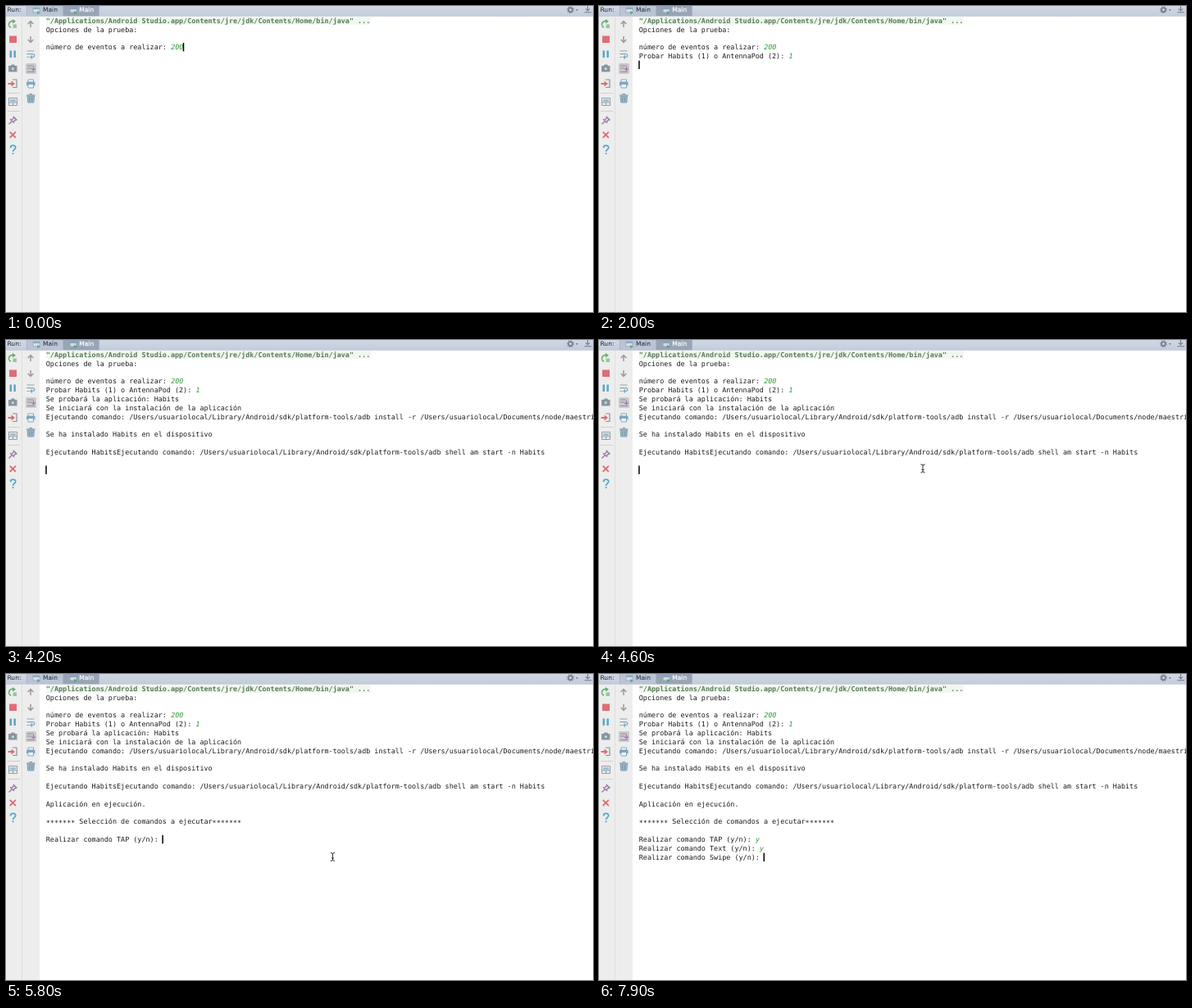
These frames come from a looping animation (716x374 px, 8 s). An HTML page:

```html
<!DOCTYPE html>
<html lang="es">
<head>
<meta charset="utf-8">
<title>Consola</title>
<style>
  html, body { margin: 0; width: 100%; height: 100%; overflow: hidden; background: #fff; }
  svg { display: block; width: 716px; height: 374px; }
  text { white-space: pre; text-rendering: geometricPrecision; }
  #console { font: 8.434px "DejaVu Sans Mono", monospace; fill: #1c1c1c; }
  #console .command { font-weight: bold; fill: #587a58; }
  #console .input { font-style: italic; fill: #319a3a; }
  .ui { font: 7.5px "DejaVu Sans", sans-serif; fill: #20242b; }
  .line { fill: none; stroke-width: 1.2; }
</style>
</head>
<body>
<svg viewBox="0 0 716 374">
  <defs>
    <linearGradient id="bar" x2="0" y2="1">
      <stop stop-color="#d0d8e4"/><stop offset="1" stop-color="#c3ccda"/>
    </linearGradient>
    <g id="tab-icon" opacity=".8">
      <path d="M0 0h8v6H0z" fill="#dfe6ee" stroke="#8595a8" stroke-width=".7"/>
      <path d="M0 0h8v2H0z" fill="#7fa5c4"/>
      <path d="M5 4l4 2.3-4 2.3z" fill="#58a65c"/>
    </g>
    <path id="arrow" d="M0 4V-3.5M-3.3 0L0-3.5 3.3 0" class="line" stroke="#8c8c8c" style="stroke-width:1.5"/>
  </defs>

  <rect width="716" height="374" fill="#fff"/>
  <rect y="12" width="41" height="362" fill="#ededed"/>
  <path d="M19.5 13v361" stroke="#dedede"/>
  <path d="M2 106.5h15M2 128.5h15" stroke="#cfcfcf"/>

  <rect width="716" height="12.5" fill="url(#bar)"/>
  <rect x="26" width="43" height="12.5" fill="#b9c5d5"/>
  <rect x="70" width="43.5" height="12.5" fill="#98a5b7"/>
  <path d="M25.5 0v12M69.5 0v12M113.5 0v12" stroke="#a9b4c3"/>
  <path d="M0 12.5h716" stroke="#c3cad4" stroke-width=".6"/>
  <use href="#tab-icon" x="33" y="2"/>
  <use href="#tab-icon" x="78" y="2"/>
  <text class="ui" x="1.5" y="7.4">Run:</text>
  <text class="ui" x="45" y="7.4">Main</text>
  <text class="ui" x="89.3" y="7.4" style="fill:#fff;stroke:#fff;stroke-width:.25">Main</text>
  <g fill="none" stroke="#727b88">
    <circle cx="688.5" cy="4.7" r="2.4" stroke-width="1.6"/>
    <circle cx="688.5" cy="4.7" r="3.8" stroke-width="1.1" stroke-dasharray="1.49"/>
    <path d="M709.5 0v5.5M707 3.3l2.5 2.5 2.5-2.5M705.5 7.8h8.5" stroke-width="1.1"/>
  </g>
  <path d="M694.7 4h3.2l-1.6 1.9z" fill="#727b88"/>

  <g opacity=".85">
    <!-- left tools -->
    <g class="line" stroke="#4fa35a">
      <path d="M9.3 18.7A4 4 0 1 0 6 26.3" style="stroke-width:1.6"/>
      <path d="M8 16l4 2.8-4 2.8z" fill="#4fa35a" stroke="none"/>
      <path d="M8.5 22.5H13V27H8.5z" fill="#7fc487" stroke="none"/>
    </g>
    <rect x="4" y="36.5" width="9" height="8.5" fill="#db5860"/>
    <path d="M4.5 54.5h2.5v8.5H4.5zM9.4 54.5h2.5v8.5H9.4z" fill="#4699c2"/>
    <path d="M3 73h2.7l1-1.5h3.4l1 1.5h2.4v7.5H3z" fill="#7c8992"/>
    <circle cx="8.3" cy="76.7" r="2.4" fill="#a9d0e4" stroke="#52636f" stroke-width=".8"/>
    <path d="M8 90h5v9.5H8" class="line" stroke="#75808d"/>
    <path d="M2.5 94h4v-2.6L11 95l-4.5 3.6V96h-4z" fill="#d8575d"/>
    <path d="M3.5 112.5h10v9h-10zM3.5 118h10M8.5 118v3" class="line" stroke="#82909c" style="stroke-width:1"/>
    <path d="M5 114h7v3H5z" fill="#8bbbd8"/>
    <path d="M3.5 144.5l3.6-3.5M5 138.2l5 4.8M6.5 139.5l3.3-3M9 141.8l3.2-3.2M8.8 135l4.6 4.6" class="line" stroke="#9269a2" style="stroke-width:1.5"/>
    <path d="M4.7 153.8l7.2 7.2M11.9 153.8l-7.2 7.2" class="line" stroke="#db5860" style="stroke-width:1.8"/>
    <path d="M5.5 173.5c0-4 6.2-4 6.2-.5 0 2.4-3.1 2.4-3.1 5" class="line" stroke="#399cc5" style="stroke-width:1.8"/>
    <circle cx="8.6" cy="180.3" r="1.1" fill="#399cc5"/>

    <!-- right tools -->
    <use href="#arrow" x="30" y="22"/>
    <use href="#arrow" transform="translate(30 41) scale(1 -1)"/>
    <path d="M25.5 55h9M25.5 62.5h3" class="line" stroke="#8a949e"/>
    <path d="M25.5 58.7h7c3 0 3 3.8 0 3.8h-2M32 60.5l-2 2 2 2" class="line" stroke="#5f9dbd"/>
    <rect x="24" y="70" width="13" height="13" rx="1.5" fill="#c4c4c6"/>
    <path d="M26 73h7.5M26 76h5M26 80.5h9" class="line" stroke="#8b7b95"/>
    <path d="M33.5 74v4.5M31.3 76.5l2.2 2.2 2.2-2.2" class="line" stroke="#9a62aa"/>
    <path d="M27 90h6.5v3H27zM27 96h6.5v4H27z" fill="#fff" stroke="#7299b0"/>
    <path d="M25 92.8h10.5v4.5H25z" fill="#689dba"/>
    <path d="M27.5 96h5.5v3h-5.5z" fill="#eef4f8"/>
    <path d="M26 110h8.5l-.7 8h-7.1z" fill="#8fb0c2" stroke="#648a9f" stroke-width=".9"/>
    <path d="M25 109h10.5M28.5 107.6h3.5M28.8 111.5v5M31.7 111.5v5" class="line" stroke="#527f98" style="stroke-width:1"/>
  </g>

  <rect x="49" y="13.3" width="396" height="9.5" fill="#f0f7ef"/>
  <g id="console"></g>
  <rect id="caret" width="1.5" height="10.4" fill="#000"/>
  <g id="pointer" fill="none" stroke="#333" stroke-width="1">
    <path d="M-2.6-5Q0-5 0-3.5Q0-5 2.6-5M0-4V4M-2.6 5Q0 5 0 3.5Q0 5 2.6 5M-1.5 1.5h3"/>
  </g>
</svg>
<script>
const LOOP = 8000, LEFT = 48.8, ADVANCE = 5.0775, BASE = 20.7, PITCH = 10.85;
const consoleBox = document.getElementById("console");
const caret = document.getElementById("caret");
const pointer = document.getElementById("pointer");
const columnX = col => LEFT + col * ADVANCE;
const baseline = row => BASE + row * PITCH;

const adb = "/Users/usuariolocal/Library/Android/sdk/platform-tools/adb";
const stars = "∗".repeat(7); // sits at mid-height, unlike the raised asterisk
// start time, row, column, text, class
const prints = [
  [0, 0, 0, '"/Applications/Android Studio.app/Contents/jre/jdk/Contents/Home/bin/java" ...', "command"],
  [0, 1, 0, "Opciones de la prueba:"],
  [0, 3, 0, "número de eventos a realizar:"],
  [0, 3, 30, "200", "input"],
  [700, 4, 0, "Probar Habits (1) o AntennaPod (2):"],
  [1500, 4, 36, "1", "input"],
  [2100, 5, 0, "Se probará la aplicación: Habits"],
  [2100, 6, 0, "Se iniciará con la instalación de la aplicación"],
  [2100, 7, 0, `Ejecutando comando: ${adb} install -r /Users/usuariolocal/Documents/node/maestria/`],
  [3500, 9, 0, "Se ha instalado Habits en el dispositivo"],
  [4000, 11, 0, `Ejecutando HabitsEjecutando comando: ${adb} shell am start -n Habits`],
  [5000, 13, 0, "Aplicación en ejecución."],
  [5000, 15, 0, `${stars} Selección de comandos a ejecutar${stars}`],
  [5000, 17, 0, "Realizar comando TAP (y/n):"],
  [6200, 17, 28, "y", "input"],
  [6800, 18, 0, "Realizar comando Text (y/n):"],
  [7500, 18, 29, "y", "input"],
  [7900, 19, 0, "Realizar comando Swipe (y/n):"]
].map(([at, row, col, text, kind = ""]) => {
  const node = document.createElementNS("http://www.w3.org/2000/svg", "text");
  node.setAttribute("x", columnX(col));
  node.setAttribute("y", baseline(row));
  node.setAttribute("class", kind);
  node.textContent = text;
  consoleBox.append(node);
  return { at, node };
});

// start time, row, column; no row hides the caret
const caretStops = [
  [0, 3, 33], [400, 4, 0], [700, 4, 36], [1200], [1500, 4, 37], [1800, 5, 0],
  [2100, 9, 0], [2600], [3000, 9, 0], [3500, 10, 0], [4000, 13, 0],
  [5000, 17, 28], [6200, 17, 29], [6600, 18, 0], [6800, 18, 29],
  [7500, 18, 30], [7700, 19, 0], [7900, 19, 30]
];

const show = (node, on) => node.setAttribute("visibility", on ? "visible" : "hidden");

function draw(now) {
  const t = Math.floor(now % LOOP);
  prints.forEach(p => show(p.node, t >= p.at));

  const [, row, col] = caretStops.findLast(stop => t >= stop[0]);
  show(caret, row !== undefined);
  if (row !== undefined) {
    caret.setAttribute("x", columnX(col) - 0.6);
    caret.setAttribute("y", baseline(row) - 8.2);
  }

  const p = Math.min(1, Math.max(0, (t - 4900) / 600));
  const ease = p * p * (3 - 2 * p);
  show(pointer, t >= 4300 && t < 6200);
  pointer.setAttribute("transform", `translate(${395 + 3.5 * ease} ${157 + 66.5 * ease})`);
  requestAnimationFrame(draw);
}
draw(performance.now());
</script>
</body>
</html>
```
